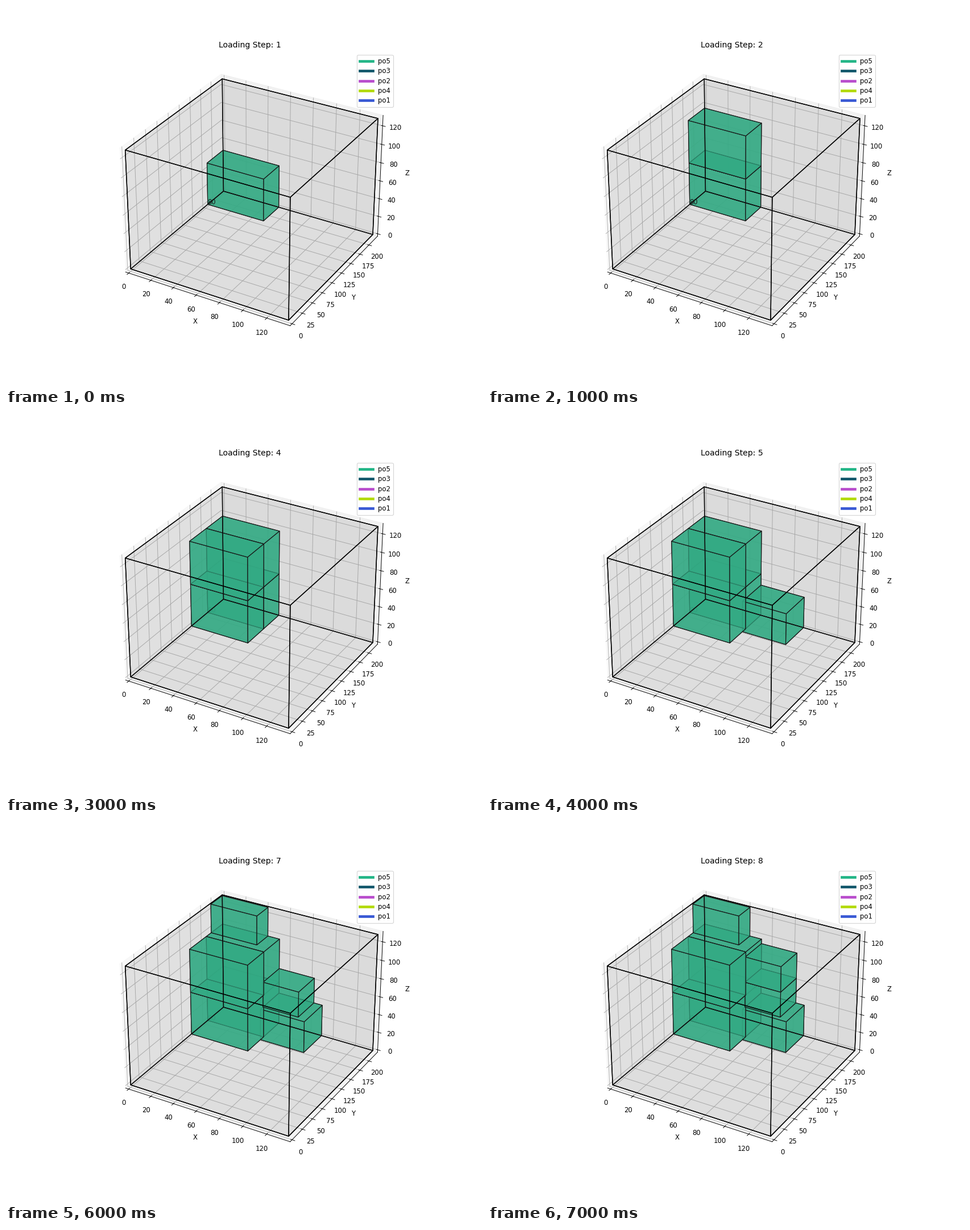
Animation, 837 px wide and 669 px high, one loop 8000 ms. Source, as a matplotlib script:

```python
import itertools

import matplotlib.pyplot as plt
from matplotlib.animation import FuncAnimation
from matplotlib.lines import Line2D
from mpl_toolkits.mplot3d.art3d import Poly3DCollection

DPI = 83.7
STEP_MS = 1000
WIDTH, DEPTH, HEIGHT = 136.5, 220, 128.5
COLORS = {
    "po5": "#22b586",
    "po3": "#10566a",
    "po2": "#b84ccc",
    "po4": "#b2da08",
    "po1": "#3858d4",
}


def stack(x, back, z, size, count=1):
    """Equal boxes piled up, with their rear face at y = back."""
    return [((x, back - size[1], z + i * size[2]), size) for i in range(count)]


def load_plan():
    """(origin, size) of every box in loading order."""
    big, low, small = (52, 40, 48), (39, 48, 35), (41.5, 28, 31.5)
    turned = small[-1:] + small[:-1]
    return [
        *stack(0, DEPTH, 0, big, 2),
        *stack(0, DEPTH - big[1], 0, big, 2),
        *stack(big[0], DEPTH, 0, low),
        *stack(0, DEPTH, 2 * big[2], small),
        *stack(big[0], DEPTH, low[2], turned, 2),
    ]


def cuboid_faces(origin, size):
    """Six quads of an axis-aligned box."""
    faces = []
    for axis, side in itertools.product(range(3), (0, 1)):
        quad = []
        for a, b in ((0, 0), (1, 0), (1, 1), (0, 1)):
            unit = [a, b]
            unit.insert(axis, side)
            quad.append([o + u * s for o, u, s in zip(origin, unit, size)])
        faces.append(quad)
    return faces


def add_cuboid(origin, size, color, alpha, width):
    poly = Poly3DCollection(cuboid_faces(origin, size), facecolors=[(color, alpha)],
                            edgecolors="black", linewidths=width)
    ax.add_collection3d(poly)
    return poly


def padded(length):
    """Axis limits with a narrow margin around the container."""
    return -length / 48, length * 49 / 48


fig = plt.figure(figsize=(10, 669.001 / DPI), dpi=DPI)
ax = fig.add_subplot(111, projection="3d")
ax.set(xlim=padded(WIDTH), ylim=padded(DEPTH), zlim=padded(HEIGHT),
       xlabel="X", ylabel="Y", zlabel="Z")

plan = load_plan()
add_cuboid((0, 0, 0), (WIDTH, DEPTH, HEIGHT), "gray", 0.1, 1.2)
boxes = [add_cuboid(pos, size, COLORS["po5"], 0.7, 1) for pos, size in plan]
ax.text(*plan[0][0], "80")

handles = [Line2D([], [], color=c, lw=4, label=name) for name, c in COLORS.items()]
ax.legend(handles=handles, loc="upper right", labelspacing=0.38)
title = ax.set_title("Loading Step: 1")


def update(step):
    for i, box in enumerate(boxes):
        box.set_visible(i <= step)
    title.set_text(f"Loading Step: {step + 1}")
    return [*boxes, title]


anim = FuncAnimation(fig, update, frames=len(boxes), interval=STEP_MS,
                     init_func=lambda: update(0), repeat=True, repeat_delay=0)

plt.show()
```
